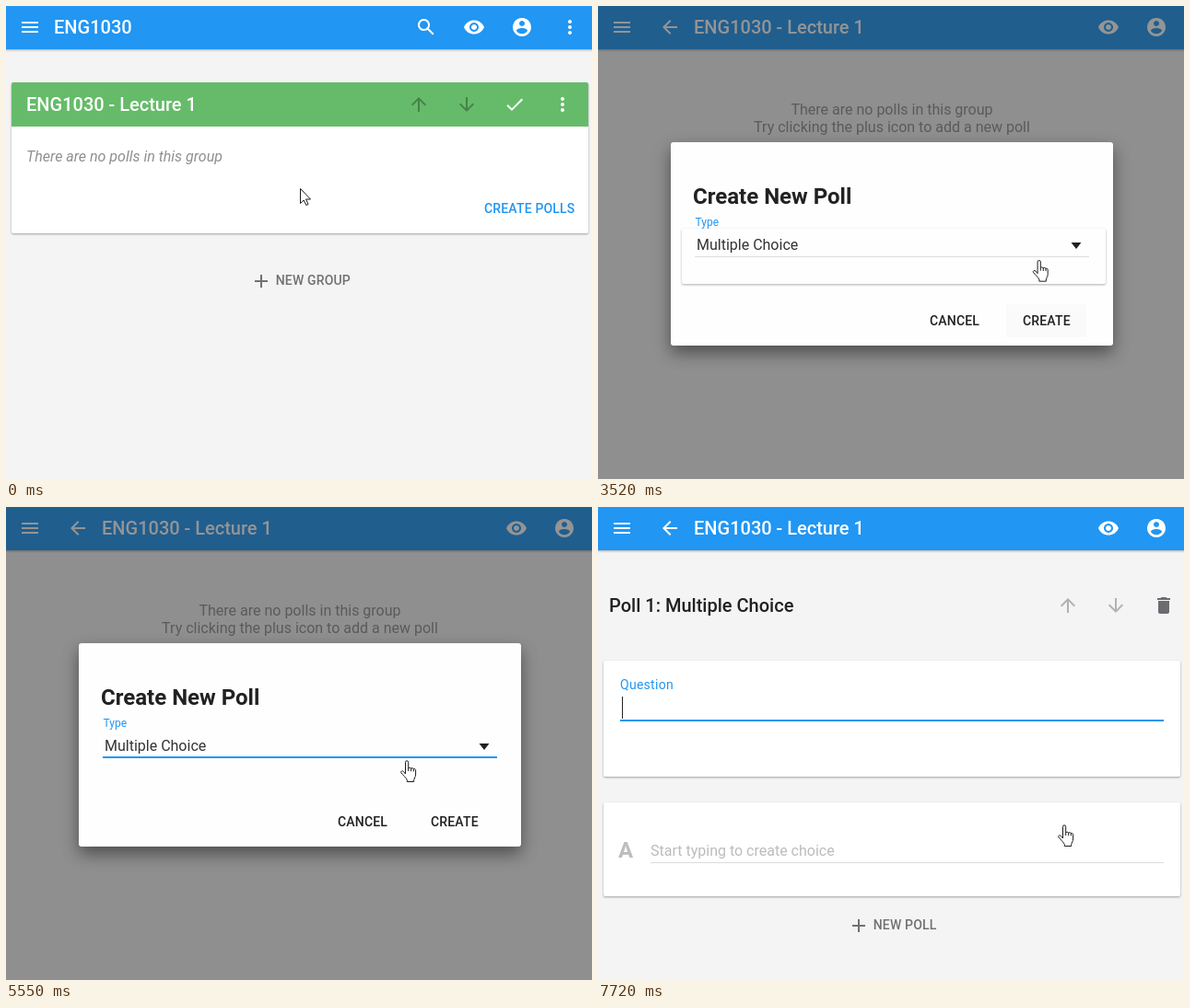
These frames come from a looping animation (636 by 514 pixels, 8 s). An HTML page:

```html
<!DOCTYPE html>
<html lang="en">
<head>
<meta charset="utf-8">
<title>Create a poll</title>
<style>
  html, body { margin: 0; width: 100%; height: 100%; overflow: hidden; background: #f4f4f4; }
  svg { display: block; width: 100%; height: 100%; }
  text { font: 400 16px Roboto, sans-serif; white-space: pre; }
  .title { font-size: 20px; font-weight: 500; }
  .btn { font-size: 14px; font-weight: 500; letter-spacing: .012em; }
  .head { font-size: 24px; font-weight: 700; }
  .label { font-size: 12px; }
  .question { font-size: 14px; letter-spacing: .02em; }
  .note { font-style: italic; }
  .mid { text-anchor: middle; }
  .bar { fill: #2196f3; filter: drop-shadow(0 1px 1px rgba(0,0,0,.32)); }
  .card { fill: #fff; filter: drop-shadow(0 1px 1px rgba(0,0,0,.35)); }
  .sheet { fill: #fefefe; filter: drop-shadow(0 8px 9px rgba(0,0,0,.45)); }
  .list { fill: #fefefe; filter: drop-shadow(0 1px 1px rgba(0,0,0,.32)); }
</style>
</head>
<body>
<svg id="stage" viewBox="0 0 636 514" preserveAspectRatio="none"></svg>
<script>
const LOOP = 8000, STEP = 70;
const BLUE = '#2196f3', GREY = '#8f8f8f', MID = '#717171', INK = '#212121';
const stage = document.getElementById('stage');

// Icons on a 24 unit grid: strokes for line icons, even-odd fills for solid ones
const LINES = {
  menu: 'M3 7h18M3 12h18M3 17h18',
  add: 'M5 12h14M12 5v14',
  arrow: 'M4.7 12.7L12 5.4l7.3 7.3M12 20V5.4',
  check: 'M4.1 12.7L9 17.6 20.3 6.3',
  search: 'M9.5 4a5.5 5.5 0 1 0 .01 0zM13.8 13.8l6 6'
};
const SOLIDS = {
  eye: 'M1 12C5 2 19 2 23 12 19 22 5 22 1 12zM12 7a5 5 0 1 0 .01 0zM12 9a3 3 0 1 0 .01 0z',
  account: 'M12 2a10 10 0 1 0 .01 0zM12 5a3 3 0 1 0 .01 0zM6 16c0-4 12-4 12 0-3 4.3-9 4.3-12 0z',
  more: [4, 10, 16].map(y => `M12 ${y}a2 2 0 1 0 .01 0z`).join(''),
  trash: 'M6 7h12v12q0 2-2 2H8q-2 0-2-2zM5 4h3.5l1-1h5l1 1H19v2H5z'
};

const icon = (name, x, y, color = '#fff', turn = 0) => {
  const paint = LINES[name] ? `fill="none" stroke="${color}" stroke-width="2"` : `fill="${color}" fill-rule="evenodd"`;
  return `<path d="${LINES[name] || SOLIDS[name]}" ${paint} transform="translate(${x} ${y}) rotate(${turn}) translate(-12 -12)"/>`;
};
const text = (s, x, y, fill, cls = '', extra = '') =>
  `<text x="${x}" y="${y}" fill="${fill}" class="${cls}" ${extra}>${s}</text>`;
const rect = (x, y, w, h, attrs) =>
  `<rect x="${x}" y="${y}" width="${w}" height="${h}" ${attrs}/>`;
const card = (y, h) => rect(6, y, 626, h, 'rx="2" class="card"');
const addButton = (s, x, y) => icon('add', x, y, MID) + text(s, x + 15.7, y + 4, MID, 'btn');
const arrows = (x, color) => icon('arrow', x, 107, color) + icon('arrow', x + 52, 107, color, 180);
const bar = rect(-5, -5, 646, 52, 'class="bar"') + icon('menu', 26, 23);

const groupPage = bar + text('ENG1030', 52, 30, '#fff', 'title')
  + ['search', 'eye', 'account', 'more'].map((name, i) => icon(name, 456 + 52 * i, 23)).join('')
  + card(83, 164) + '<path d="M6 131V85q0-2 2-2H630q2 0 2 2V131z" fill="#66bb6a"/>'
  + text('ENG1030 - Lecture 1', 22, 114, '#fff', 'title')
  + arrows(448, 'rgba(0,0,0,.3)') + icon('check', 552, 107) + icon('more', 604, 107)
  + text('There are no polls in this group', 22, 169, GREY, 'note')
  + text('CREATE POLLS', 519, 225, BLUE, 'btn') + addButton('NEW GROUP', 277, 299);

const lectureBar = bar + icon('arrow', 78, 23, '#fff', -90) + text('ENG1030 - Lecture 1', 104, 30, '#fff', 'title')
  + icon('eye', 554, 23) + icon('account', 606, 23);

const emptyList = text('There are no polls in this group', 319, 118, GREY, 'mid')
  + text('Try clicking the plus icon to add a new poll', 319, 137, GREY, 'mid') + addButton('NEW POLL', 283, 165);

const pollForm = text('Poll 1: Multiple Choice', 12, 114, INK, 'title')
  + arrows(510, '#b2b2b4') + icon('trash', 614, 107, '#6d6b70')
  + card(167, 126) + text('Question', 24, 198, BLUE, 'question')
  + rect(24, 231, 590, 2, `fill="${BLUE}"`) + rect(26, 206, 1, 24, `id="caret" fill="${INK}"`)
  + card(321, 102) + text('A', 22, 381, '#bdbdbd', 'head')
  + text('Start typing to create choice', 57, 379, '#bcbcbc') + rect(57, 386, 557, 1, 'fill="#dcdcdc"')
  + addButton('NEW POLL', 283, 455);

const dialog = rect(79, 148, 480, 221, 'rx="3" class="sheet"')
  + text('Create New Poll', 103, 215, INK, 'head')
  + text('Type', 105.5, 239, GREY, 'label', 'id="label"')
  + text('CANCEL', 360, 347, INK, 'btn')
  + rect(443, 324, 87, 36, 'id="hover" rx="2"') + text('CREATE', 461, 347, INK, 'btn')
  + '<g id="menu"><rect id="panel" x="91" width="460" rx="2" class="list"/><g id="rows">'
  + rect(91, 235, 460, 48, 'fill="#e7f3fd"') + text('Multiple Choice', 107, 265, BLUE)
  + text('Word Cloud', 107, 313, '#424242') + '</g></g>'
  + '<g id="field">' + text('Multiple Choice', 107, 265, '#333') + `<path d="M513.5 257h11l-5.5 7z" fill="${INK}"/>`
  + rect(105, 272, 428, 1, 'id="line"') + '</g>';

const outline = 'fill="#fff" stroke="#1c1c1c" stroke-linejoin="round"';
const cursors = `<path id="arrow" ${outline} d="M.5.5V16.5L4.2 13l2.6 5.5 2.2-1L6.5 12H11.5z"/>`
  + `<path id="hand" ${outline} d="M5.5 15V2.4a1.6 1.6 0 0 1 3.2 0V8.6q1.5-1 3 .4 1.4-1 2.7.6 1.6-.6 2.2 1V16`
  + 'c0 2-1.3 3.5-1.9 5.5v2H7.3v-2C6 19 2.5 16 .8 13.6c-.6-1.5 1.4-2.5 2.6-1.2zM8.7 8.6V12M11.7 9v3.3M14.4 9.6v2.8"/>';

stage.innerHTML = `<g id="group">${groupPage}</g><g id="lecture">${lectureBar}<g id="empty">${emptyList}</g>`
  + `<g id="form">${pollForm}</g></g>` + rect(0, 0, 636, 514, `id="shade" fill="${INK}"`)
  + `<g id="dialog">${dialog}</g>` + cursors;

const el = {};
stage.querySelectorAll('[id]').forEach(n => el[n.id] = n);

const ramp = (t, a, b) => Math.min(1, Math.max(0, (t - a) / (b - a)));
const easeOut = (u, power = 2) => 1 - (1 - u) ** power;
const within = (t, a, b) => t >= a && t < b;
const show = (n, on) => n.style.display = on ? '' : 'none';
const set = (n, attrs) => { for (const k in attrs) n.setAttribute(k, attrs[k]); };
const fade = (n, a) => { show(n, a > 0); n.setAttribute('opacity', a); };

// Pointer stops: start of the move, its length, where it ends
const MOVES = [
  [930, 840, 599, 209], [1770, 70, 546, 209], [2750, 210, 475, 323], [2960, 70, 502, 275],
  [3450, 840, 209, 283], [4290, 140, 201, 258], [4990, 560, 434, 275], [5550, 210, 468, 331], [5760, 210, 505, 345]
];

function pointerAt(t) {
  let x = 319, y = 198;
  for (const [from, length, toX, toY] of MOVES) {
    const u = ramp(t, from, from + length);
    x += (toX - x) * u;
    y += (toY - y) * u;
  }
  return [x, y];
}

function draw(ms) {
  // The picture advances in fixed ticks
  const t = ms < 1000 ? 0 : 1000 + Math.floor((ms - 1000) / STEP) * STEP;

  const form = ramp(t, 6740, 7020);
  show(el.group, t < 2050);
  show(el.lecture, t >= 2050);
  fade(el.empty, 1 - form);
  fade(el.form, form);
  show(el.caret, !within(t, 7300, 7720));

  const open = easeOut(ramp(t, 2050, 2260), 3) - ramp(t, 6320, 6600) ** 1.45;
  fade(el.shade, .48 * (ramp(t, 2050, 2260) - ramp(t, 6250, 6390)));
  fade(el.dialog, open);
  set(el.dialog, { transform: `translate(319 258.5) scale(${.5 + open / 2}) translate(-319 -258.5)` });

  const grow = easeOut(ramp(t, 3520, 3730)), close = ramp(t, 4990, 5270);
  const rows = ramp(t, 3520, 3800);
  fade(el.menu, t < 3520 ? 0 : 1 - close);
  fade(el.rows, rows);
  fade(el.field, 1 - rows + close);
  set(el.panel, { y: 242 - 15 * grow, height: 60 + 52 * grow });

  const active = within(t, 3380, 6250);
  const thick = active && !within(t, 3520, 4990);
  set(el.label, { fill: active ? BLUE : GREY });
  set(el.line, { y: thick ? 271 : 272, height: thick ? 2 : 1, fill: thick ? BLUE : '#dedede' });
  set(el.hover, { fill: `rgba(0,0,0,${within(t, 2960, 3660) ? .015 : t >= 6250 ? .08 : t >= 5760 ? .04 : 0})` });

  const [x, y] = pointerAt(t);
  const pointing = within(t, 1560, 2050) || t >= 2960;
  show(el.hand, pointing);
  show(el.arrow, !pointing);
  set(el.hand, { transform: `translate(${x - 6} ${y})` });
  set(el.arrow, { transform: `translate(${x} ${y})` });
}

const start = performance.now();
function tick() {
  draw((performance.now() - start) % LOOP);
  requestAnimationFrame(tick);
}
tick();
</script>
</body>
</html>
```
